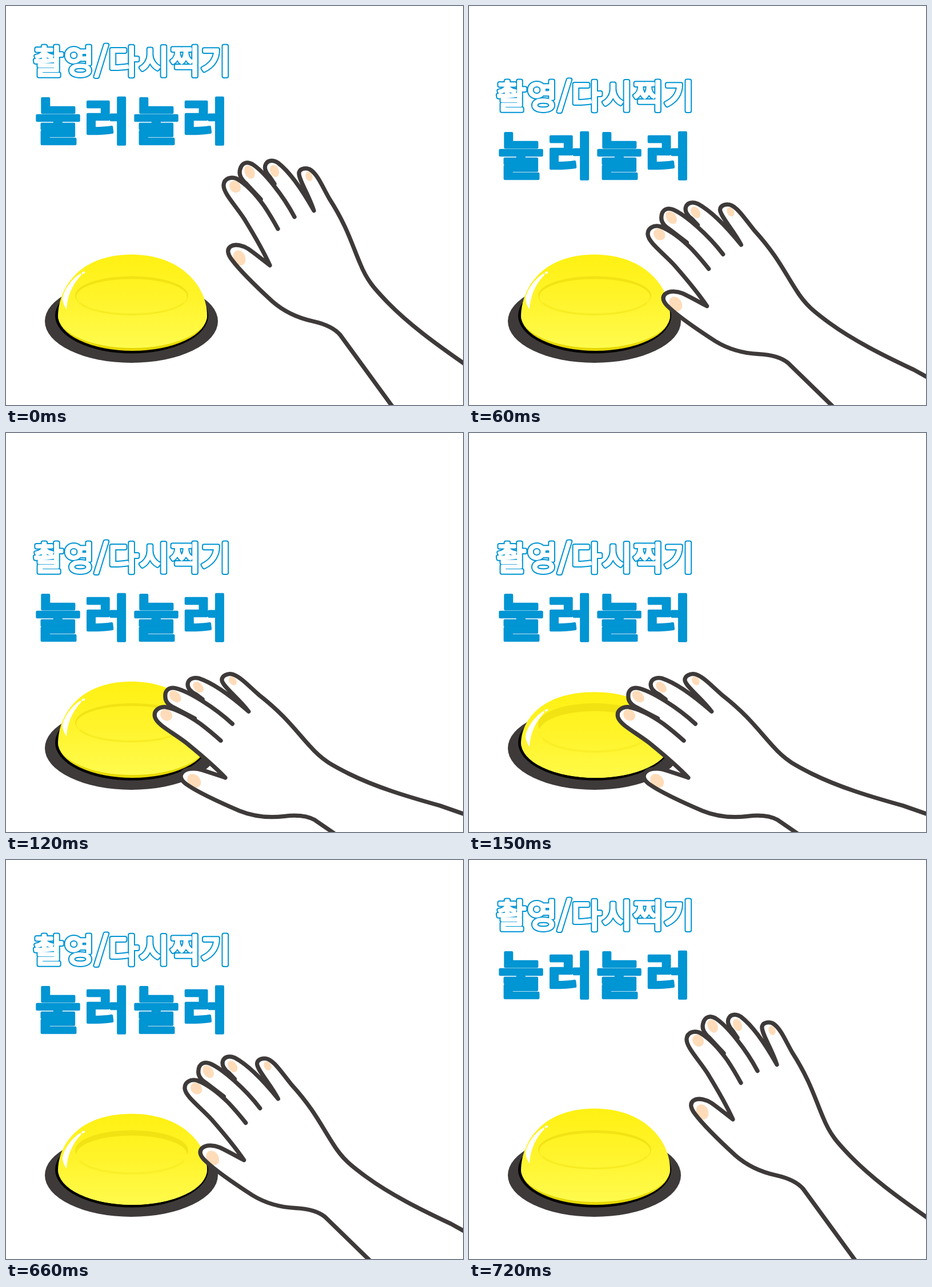
Recreate the animation shown at these times as an HTML page with a canvas. Size 800 by 700 pixels, loop 2.01 s.

```html
<!DOCTYPE html>
<html lang="ko">
<head>
<meta charset="utf-8">
<title>눌러눌러</title>
<style>
html, body { margin: 0; width: 100%; height: 100%; overflow: hidden; background: #fff; }
canvas { display: block; width: 800px; height: 700px; }
</style>
</head>
<body>
<canvas id="stage" width="800" height="700"></canvas>
<script>
const ctx = document.getElementById('stage').getContext('2d');
const LOOP = 2010, STEP = 30, RISE = 630;
const BLUE = '#0095d3', DARK = '#3e3a39', NAIL = '#ffdcb9';
const FONT = '"Noto Sans CJK KR", "Noto Sans CJK JP", "Noto Sans CJK", "Noto Sans", sans-serif';
const TILT = -19.4 * Math.PI / 180;
const PIVOT = [861, 758];
const RIM = 543;

const hand = [
  // arm, thumb and first finger
  'M737 786 L585 577 C573 563 555 557 537 553 C505 546 483 533 466 518 ' +
  'C440 494 408 462 396 446 C388 436 386 427 393 422 C402 416 416 421 424 426 ' +
  'C437 435 450 446 462 455 C448 424 432 398 418 375 C402 350 380 328 381 314 ' +
  'C382 302 394 299 404 303 C425 315 442 337 452 351 C462 366 470 380 476 391',
  // second finger
  'M446 339 L420 311 C412 304 407 295 410 286 C413 275 422 272 432 278 ' +
  'C452 291 485 332 505 370',
  // third and little finger, upper arm
  'M470 312 L462 300 C455 293 451 284 455 277 C459 270 468 270 476 275 ' +
  'C498 292 520 325 539 359 C530 330 511 303 513 292 C515 284 527 283 534 288 ' +
  'C546 297 553 315 566 338 C598 388 606 420 620 452 C632 482 645 496 668 520 ' +
  'C705 558 750 591 800 626 L880 690'
].map(d => new Path2D(d));
const palm = new Path2D('M417 309 L476 391 L560 420 L540 359 L463 300 Z');

// x, y, rx, ry, angle
const nails = [
  [401, 317, 9.5, 11, -0.6],
  [426.5, 291.5, 8.5, 12, -0.45],
  [470, 289.5, 7.5, 11, -0.4],
  [530.5, 299, 6, 8.3, -0.3],
  [408.5, 442, 10.5, 13.5, -0.4]
];

// upper half of the dome, measured from the rim
const dome = new Path2D('M91 0 C92 -47 126 -107.5 220 -107.5 C305 -107.5 352 -53 352 0 Z');
const shine = new Path2D('M131 469 C112 480 98 505 99 516 Q101 526 106 532 ' +
  'C107 510 116 488 132 472 Z');

function oval(x, y, rx, ry, color, angle = 0) {
  ctx.fillStyle = color;
  ctx.beginPath();
  ctx.ellipse(x, y, rx, ry, angle, 0, Math.PI * 2);
  ctx.fill();
}

function bowl(ry, color) {
  ctx.fillStyle = color;
  ctx.beginPath();
  ctx.ellipse(221.5, RIM, 130.5, ry, 0, 0, Math.PI);
  ctx.fill();
}

function drawRecess(press) {
  const cy = 510 + 13.5 * press, ry = 31 + 4.5 * press;
  ctx.save();
  ctx.beginPath();
  ctx.rect(91, 400, 261, 300);
  ctx.ellipse(220, cy, 97, ry, 0, 0, Math.PI * 2);
  ctx.clip('evenodd');
  oval(220, 508 + 3 * press, 99, 34 + 3 * press, 'rgba(234,220,14,.65)');
  ctx.restore();
  ctx.strokeStyle = 'rgba(240,226,20,.35)';
  ctx.lineWidth = 4;
  ctx.beginPath();
  ctx.ellipse(220, cy, 97, ry, 0, 0.35, Math.PI - 0.35);
  ctx.stroke();
}

function drawButton(press) {
  const drop = 18.5 * press;
  oval(219.5, 553, 151.5, 73, DARK);
  oval(220, RIM, 134, 66.5, '#000');

  const glow = ctx.createLinearGradient(0, 435 + drop, 0, 600 + drop);
  glow.addColorStop(0, '#fff112');
  glow.addColorStop(0.5, '#fff42c');
  glow.addColorStop(1, '#fffb4e');
  bowl(62, '#e6d800');
  bowl(57 + 5 * Math.min(1, press * 2), glow);

  const cap = new Path2D();
  cap.addPath(dome, new DOMMatrix([1, 0, 0, 1 - drop / 107.5, 0, RIM + 0.5]));
  ctx.fillStyle = glow;
  ctx.fill(cap);
  drawRecess(press);

  ctx.save();
  ctx.translate(0, drop);
  ctx.fillStyle = '#fff';
  ctx.fill(shine);
  oval(135.5, 468, 3, 1.9, '#fff', -0.4);
  ctx.restore();
}

function drawHand(turn) {
  ctx.save();
  ctx.translate(...PIVOT);
  ctx.rotate(TILT * turn);
  ctx.translate(-PIVOT[0], -PIVOT[1]);
  ctx.fillStyle = '#fff';
  for (const part of [...hand, palm]) ctx.fill(part);
  for (const [x, y, rx, ry, a] of nails) oval(x, y, rx, ry, NAIL, a);
  ctx.strokeStyle = DARK;
  ctx.lineWidth = 7.3;
  ctx.lineCap = ctx.lineJoin = 'round';
  for (const part of hand) ctx.stroke(part);
  ctx.restore();
}

function outline(text, x, y, color, width) {
  ctx.strokeStyle = ctx.fillStyle = color;
  ctx.lineWidth = width;
  ctx.strokeText(text, x, y);
  ctx.fillText(text, x, y);
}

function drawText(dy) {
  ctx.save();
  ctx.lineJoin = 'round';
  ctx.textBaseline = 'alphabetic';
  ctx.font = '400 57px ' + FONT;
  ctx.letterSpacing = '1.4px';
  outline('촬영/다시찍기', 48, 118 + dy, BLUE, 8);
  outline('촬영/다시찍기', 48, 118 + dy, '#fff', 4);
  ctx.font = '700 87px ' + FONT;
  ctx.letterSpacing = '5.9px';
  outline('눌러눌러', 51, 235 + dy, BLUE, 4.5);
  ctx.restore();
}

function draw(time) {
  const t = time % LOOP;
  const down = t < RISE;
  const p = down
    ? Math.min(Math.floor(t / STEP), 4) / 4
    : Math.max(0, 1 - (Math.floor((t - RISE) / STEP) + 1) / 4);
  const press = down ? (t < 150 ? 0 : 1) : p;
  ctx.fillStyle = '#fff';
  ctx.fillRect(0, 0, 800, 700);
  drawButton(press);
  drawHand(p * p * (3 - 2 * p));
  drawText(122 * p);
}

let start;
function tick(now) {
  if (start === undefined) start = now;
  draw(now - start);
  requestAnimationFrame(tick);
}
draw(0);
requestAnimationFrame(tick);
</script>
</body>
</html>
```
